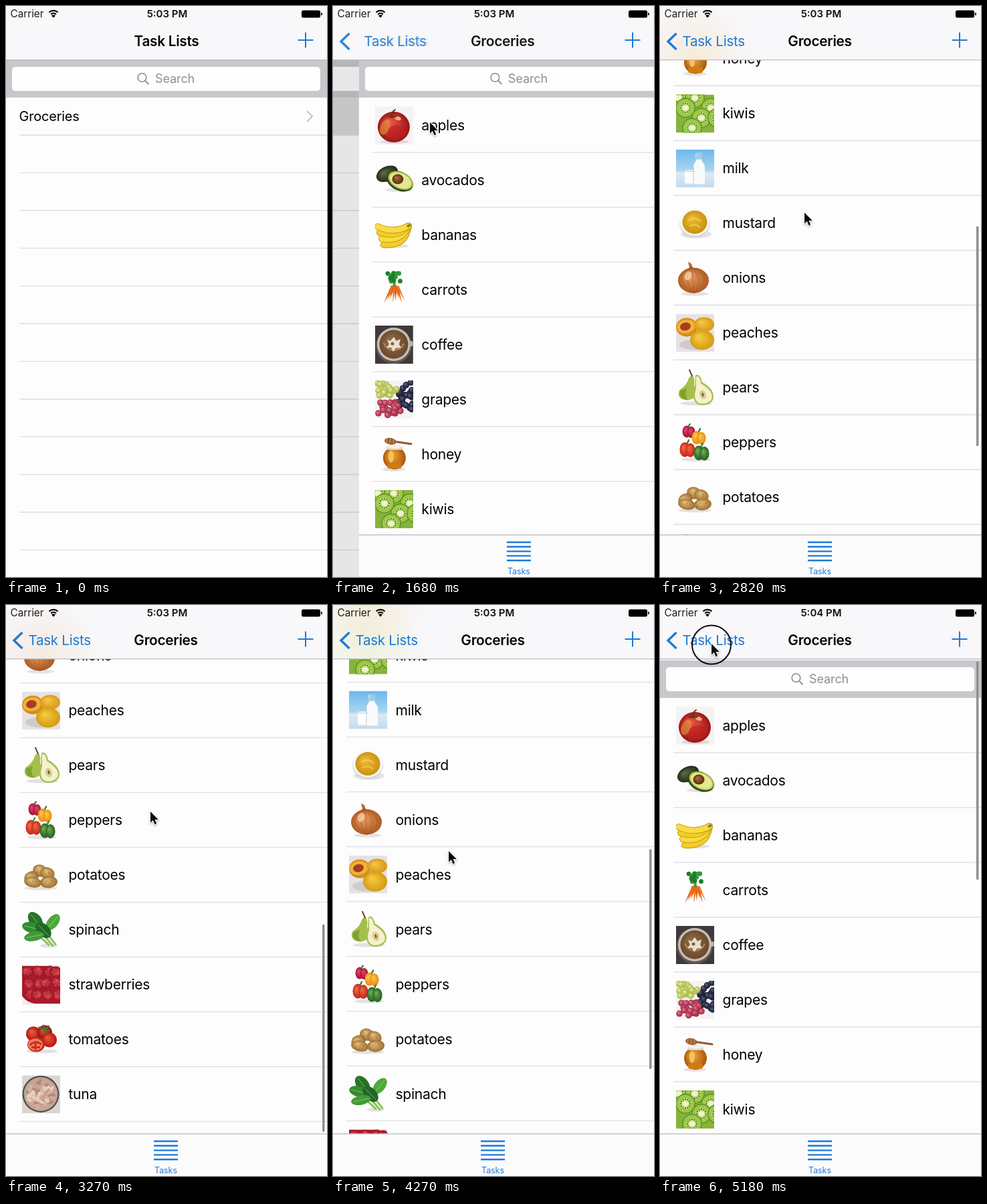
These frames come from a looping animation (480x854 px, 5.22 s). An HTML page with a canvas:

```html
<!DOCTYPE html>
<html lang="en">
<head>
<meta charset="utf-8">
<title>Task lists</title>
<style>
html, body { margin: 0; width: 100%; height: 100%; overflow: hidden; background: #fefdfe; }
canvas { display: block; width: 480px; height: 854px; }
</style>
</head>
<body>
<canvas id="stage" width="480" height="854"></canvas>
<script>
const g = document.getElementById('stage').getContext('2d');
const W = 480, H = 854, LOOP = 5220;
const NAV = 81, TAB = 791, HEAD = 56, ROW = 82, MAX = 904;
const BLUE = '#1c7bd6', PAPER = '#fefdfe', LINE = '#e1e1e6';

const clamp = v => Math.min(1, Math.max(0, v));
const span = (t, a, b) => clamp((t - a) / (b - a));
const smooth = u => u * u * (3 - 2 * u);
const mix = (a, b, u) => a + (b - a) * u;

// Drawing helpers
function rect(color, x, y, w, h, r = 0) {
  g.fillStyle = color;
  g.beginPath();
  g.roundRect(x, y, w, h, r);
  g.fill();
}

function text(str, x, y, size, color, { weight = 400, align = 'left', track = 0 } = {}) {
  g.font = `${weight} ${size}px Inter, "Liberation Sans", sans-serif`;
  g.letterSpacing = track + 'px';
  g.textAlign = align;
  g.fillStyle = color;
  g.fillText(str, x, y);
}

function stroke(color, width, d, cap = 'butt') {
  g.strokeStyle = color;
  g.lineWidth = width;
  g.lineCap = cap;
  g.stroke(new Path2D(d));
}

function area(color, d) {
  g.fillStyle = color;
  g.fill(new Path2D(d));
}

function dot(color, x, y, rx, ry = rx, rot = 0) {
  g.fillStyle = color;
  g.beginPath();
  g.ellipse(x, y, rx, ry, rot, 0, 7);
  g.fill();
}

function ball(light, dark, x, y, rx, ry = rx, rot = 0) {
  g.save();
  g.translate(x, y);
  g.rotate(rot);
  g.scale(rx, ry);
  const fill = g.createRadialGradient(-0.3, -0.35, 0.05, 0, 0, 1);
  fill.addColorStop(0, light);
  fill.addColorStop(1, dark);
  dot(fill, 0, 0, 1);
  g.restore();
}

function random(seed) {
  return () => (seed = (seed * 16807) % 2147483647) / 2147483647;
}

function scatter(seed, n, paint) {
  const rnd = random(seed);
  for (let i = 0; i < n; i++) paint(rnd(), rnd(), rnd());
}

const shade = (x, y, rx, ry = 3) => dot('rgba(90,80,80,.16)', x, y, rx, ry);

// Thumbnails, each in a 57 px square
const pics = {
  apples() {
    rect('#f4f2f2', 0, 0, 57, 57);
    shade(29, 53, 21);
    ball('#ee5a48', '#9c1416', 28, 31, 24, 23);
    dot('rgba(226,160,60,.55)', 15, 31, 7, 12, 0.4);
    dot('rgba(190,30,30,.6)', 33, 38, 14, 10);
    dot('rgba(250,210,180,.75)', 34, 18, 5, 3, 0.3);
    dot('#8b3316', 25, 15, 8, 2.5);
    stroke('#5a3519', 2, 'M25 16Q24 9 30 5', 'round');
  },
  avocados() {
    shade(36, 43, 20);
    ball('#5d6a45', '#202b19', 18, 19, 17, 11, -0.45);
    dot('#33451d', 37, 30, 21, 14, 0.45);
    dot('#a9c246', 38, 29, 19.5, 12.5, 0.45);
    dot('#e6e792', 38, 29, 17, 10.5, 0.45);
    ball('#a8703c', '#58300f', 34, 27, 8.5, 7.5);
  },
  bananas() {
    shade(28, 45, 22);
    for (let i = 0; i < 4; i++) {
      const d = `M50 15Q${46 - i * 6} ${45 - i * 6} ${13 - i * 3} ${43 - i * 9}`;
      stroke('#c99a12', 10, d, 'round');
      stroke(i % 2 ? '#f8dc42' : '#f3cd29', 8, d, 'round');
    }
    stroke('#8a8223', 4, 'M48 16L53 13');
  },
  carrots() {
    for (let i = 0; i < 8; i++) {
      const x = 13 + i * 4.5, y = 45 - (i % 3) * 3;
      area(i % 2 ? '#f07a24' : '#df5f16', `M${24 + i} 22L${29 + i} 23L${x} ${y + 3}Z`);
    }
    stroke('#4f9a32', 4, 'M29 24L28 12');
    scatter(31, 16, (a, b, c) => dot(c > 0.5 ? '#2f9c35' : '#1f7d2c', 19 + a * 19, 3 + b * 14, 3.4));
  },
  coffee() {
    rect('#40383b', 0, 0, 57, 57);
    dot('#5f5650', 28, 30, 27);
    rect('#b7b0a9', 47, 23, 10, 8, 3);
    dot('#c4beb6', 28, 28, 25);
    ball('#8f6a45', '#6b4a2d', 28, 28, 21.5);
    stroke('#b08d65', 2, 'M13 26A16 16 0 0 0 43 27');
    area('#e9dfcf', 'M18 21L23 23L28 17L32 23L38 20L36 28L39 33L31 34L27 39L24 33L17 33L21 28Z');
    dot('#80603f', 26, 27, 2.5);
  },
  grapes() {
    rect('#f5f2f4', 0, 0, 57, 57);
    const bunch = (seed, x, y, w, h, light, dark) =>
      scatter(seed, 24, (a, b) => ball(light, dark, x + a * w, y + b * h, 4.8));
    bunch(11, 36, 3, 20, 40, '#596080', '#15172a');
    bunch(23, 4, 4, 28, 20, '#eef0a2', '#a6b544');
    bunch(37, 5, 30, 34, 22, '#e2788f', '#a02342');
  },
  honey() {
    shade(28, 51, 17);
    ball('#f3ad3d', '#a95708', 29, 34, 17, 17);
    rect('#d07a12', 18, 41, 22, 9, 4);
    dot('#f5c25c', 24, 32, 4, 9);
    rect('#dcd6ce', 17, 16, 24, 6, 3);
    dot('#f4f0ea', 29, 17, 11, 3);
    stroke('#8d5a30', 3, 'M26 9L54 13', 'round');
    dot('#9a6334', 23, 9, 9, 5, 0.15);
    stroke('#d9a060', 1, 'M18 5L17 12M23 5L22 13M28 6L27 13');
  },
  kiwis() {
    rect('#86b43a', 0, 0, 57, 57);
    for (let i = 0; i < 7; i++) {
      const x = 4 + (i * 24) % 62, y = 5 + Math.floor(i / 2) * 15;
      dot('#628f22', x, y, 15);
      dot('#99c848', x, y, 13.5);
      dot('#b5d96a', x, y, 9);
      for (let k = 0; k < 12; k++) dot('#35471a', x + 7 * Math.cos(k * 0.524), y + 7 * Math.sin(k * 0.524), 0.9);
      dot('#eff3cf', x, y, 4.8, 4);
    }
  },
  milk() {
    const sky = g.createLinearGradient(0, 0, 0, 57);
    sky.addColorStop(0, '#6db7ea');
    sky.addColorStop(0.55, '#a9d5f1');
    sky.addColorStop(0.62, '#dce9f2');
    sky.addColorStop(1, '#c3dbec');
    rect(sky, 0, 0, 57, 57);
    area('#f8fafb', 'M29 6H39L38 16L43 24V52H26V24L30 16Z');
    rect('#9fcbe8', 30, 5, 9, 10);
    rect('#fdfdfd', 13, 31, 15, 20, 2);
    stroke('#b4cbd9', 1, 'M13 33H28M26 25V52');
  },
  mustard() {
    shade(30, 45, 23, 6);
    dot('#d8d6d8', 28, 29, 23, 21);
    dot('#f7f6f6', 28, 27, 22.5, 20);
    ball('#eebc31', '#cb9213', 28, 27, 18.5, 17.5);
    stroke('#f3cf62', 1.5, 'M18 25Q28 17 37 26M20 33Q29 28 36 35');
  },
  onions() {
    shade(28, 52, 20);
    area('#b96a31', 'M18 4L23 7L25 13Q39 17 36 26H9Q12 16 20 13Z');
    ball('#e9a064', '#ad5a23', 26, 32, 23, 19);
    for (let i = 0; i < 5; i++) stroke('rgba(140,66,22,.4)', 1, `M23 12Q${-8 + i * 17} 30 27 51`);
    dot('rgba(255,225,190,.6)', 18, 25, 5, 7, 0.4);
  },
  peaches() {
    rect('#e6e2e3', 0, 0, 57, 57);
    shade(30, 46, 25, 8);
    ball('#f2bd38', '#cf8714', 16, 20, 16, 14);
    dot('#f0b238', 15, 19, 14, 10, -0.2);
    dot('#a63c22', 14, 19, 8, 6, -0.2);
    ball('#f5c843', '#d9981b', 42, 16, 15, 11);
    ball('#f7cd3f', '#d59a15', 39, 39, 18, 15);
  },
  pears() {
    shade(30, 52, 24);
    area('#a5c04a', 'M23 10Q29 12 27 24Q33 46 17 47Q0 46 5 32Q17 24 19 14Z');
    area('#7fa22f', 'M6 33Q3 45 18 47Q12 40 16 29Z');
    stroke('#594223', 2, 'M24 11L20 2', 'round');
    area('#a8bf55', 'M29 10Q36 6 39 20Q60 32 55 47Q47 58 32 53Q22 46 28 29Z');
    area('#f4f1cd', 'M30 12Q35 9 37 22Q57 34 53 46Q45 55 33 51Q25 44 30 30Z');
    dot('#d9cd91', 40, 39, 5, 7, -0.3);
    dot('#7b5a2a', 40, 39, 1.5, 3, -0.3);
  },
  peppers() {
    const pepper = (light, dark, x, y, r) => {
      ball(light, dark, x - r * 0.35, y, r * 0.7, r);
      ball(light, dark, x + r * 0.4, y + 1, r * 0.65, r * 0.95);
      stroke('#3f8a34', 2.5, `M${x} ${y - r + 1}L${x + 2} ${y - r - 3}`, 'round');
    };
    shade(30, 54, 22);
    pepper('#e2476a', '#a50f31', 19, 12, 9);
    pepper('#ffc94a', '#ea8a12', 34, 21, 10);
    pepper('#f26a43', '#c4261a', 17, 39, 11);
    pepper('#6fae50', '#235f22', 38, 44, 11);
  },
  potatoes() {
    shade(28, 48, 25);
    const spud = (x, y, rx, ry, rot) => ball('#e2bd80', '#a0702f', x, y, rx, ry, rot);
    spud(27, 22, 11, 9, 0.3);
    spud(14, 32, 11, 9, -0.4);
    spud(38, 26, 11, 9, 0.4);
    spud(16, 39, 13, 8, 0.2);
    spud(40, 39, 13, 9, -0.1);
    scatter(7, 12, (a, b) => dot('rgba(110,72,28,.5)', 8 + a * 40, 22 + b * 22, 1));
  },
  spinach() {
    shade(40, 52, 13);
    stroke('#8cc25a', 3, 'M27 30L46 52M31 26L50 50M24 36L40 51', 'round');
    const leaf = (color, x, y, rx, ry, rot) => {
      dot(color, x, y, rx, ry, rot);
      const dx = Math.cos(rot) * rx * 0.8, dy = Math.sin(rot) * rx * 0.8;
      stroke('rgba(170,215,130,.7)', 1, `M${x - dx} ${y - dy}L${x + dx} ${y + dy}`);
    };
    leaf('#267428', 20, 14, 14, 9, 0.9);
    leaf('#4da83b', 46, 17, 14, 8, -0.9);
    leaf('#338c30', 14, 25, 14, 8, 0.25);
    leaf('#1f6826', 32, 29, 14, 9, 0.8);
    leaf('#429a37', 18, 38, 15, 7, -0.2);
  },
  strawberries() {
    rect('#a91a2a', 0, 0, 57, 57);
    area('#f6eeee', 'M0 45Q8 57 25 57H0ZM44 0H57V9Z');
    for (let i = 0; i < 12; i++) {
      const x = 8 + (i % 4) * 14 + (i % 3) * 2, y = 9 + Math.floor(i / 4) * 17;
      ball('#db4650', '#9c1425', x, y, 9.5, 8, i);
      for (let k = 0; k < 5; k++) dot('#e78a7c', x + 5 * Math.cos(k * 1.3 + i), y + 4 * Math.sin(k * 1.3 + i), 0.7);
    }
  },
  tomatoes() {
    shade(30, 46, 23);
    ball('#ef5944', '#a8170f', 17, 20, 11);
    ball('#e44b37', '#8f120c', 34, 18, 11);
    ball('#f0553d', '#b11a11', 41, 29, 11);
    stroke('#46752c', 2, 'M25 10L40 15M32 7L36 19M40 8L32 17', 'round');
    dot('#c8261a', 21, 36, 13, 11);
    dot('#ef8064', 20, 36, 11, 9);
    stroke('#cb2f20', 3, 'M12 37Q20 28 29 36M20 31V44M14 40H27');
  },
  tuna() {
    rect('#d9d6d2', 0, 0, 57, 57);
    dot('#4d4844', 28, 28, 27.5);
    dot('#a9a29a', 28, 28, 25.5);
    dot('#c9a595', 28, 28, 24);
    scatter(53, 46, (a, b, c) => {
      const r = 20 * Math.sqrt(a), q = b * 6.283;
      dot(c > 0.6 ? '#e6cfc0' : c > 0.3 ? '#b78877' : '#d5b4a2', 28 + r * Math.cos(q), 28 + r * Math.sin(q), 4, 2.2, c * 6);
    });
  }
};
const items = Object.keys(pics);

// Colours that shine through the navigation bar
const tints = { bananas: '250,225,60', kiwis: '190,215,80', onions: '225,165,100', honey: '235,170,60' };

function thumb(name, x, y) {
  g.save();
  g.translate(x, y);
  g.beginPath();
  g.rect(0, 0, 57, 57);
  g.clip();
  pics[name]();
  g.restore();
}

function searchBar(y) {
  rect('#c8c7cc', 0, y, W, HEAD);
  rect('#fefefe', 9, y + 10, 461, 36, 5);
  g.strokeStyle = '#8b8b90';
  g.lineWidth = 1.6;
  g.beginPath();
  g.arc(203.5, y + 26, 6.3, 0, 7);
  g.stroke();
  stroke('#8b8b90', 1.8, `M208 ${y + 30.6}L213.5 ${y + 36}`);
  text('Search', 223, y + 34, 18, '#8e8e93', { track: -0.1 });
}

function listScreen(pressed) {
  rect(PAPER, 0, 0, W, H);
  searchBar(NAV);
  if (pressed) rect('#d9d9d9', 0, 137, W, 56);
  for (let y = 193; y < H; y += 56.4) rect(LINE, 20, y - 0.7, W, 1.6);
  text('Groceries', 19.5, 172, 20, '#000', { track: -0.2 });
  stroke('#c3c3c8', 2, 'M450 157L458 165L450 173');
}

function scrollBar(pos, alpha) {
  const over = Math.max(0, -pos, pos - MAX);
  const top = 84 + Math.min(MAX, Math.max(0, pos)) * 0.4147 + (pos > MAX ? over : 0);
  g.globalAlpha = alpha;
  rect('#8f8f92', 473, top, 3.5, 329 - over, 1.7);
  g.globalAlpha = 1;
}

function taskScreen(pos, barAlpha) {
  rect(PAPER, 0, 0, W, H);
  if (pos < 0) rect('#f4f4f6', 0, NAV, W, -pos);
  searchBar(NAV - pos);
  items.forEach((name, i) => {
    const y = NAV + HEAD + i * ROW - pos;
    if (y > TAB || y + ROW < 0) return;
    thumb(name, 24, y + 13);
    text(name, 93.5, y + 49, 21, '#000', { track: -0.25 });
    rect(LINE, 20, y + ROW - 0.8, W, 1.6);
  });
  scrollBar(pos, barAlpha);
  rect('#fbfbfc', 0, TAB, W, H);
  rect('#c2c2c5', 0, TAB - 0.7, W, 1.4);
  for (let i = 0; i < 5; i++) rect(BLUE, 221, 800.8 + i * 6.8, 36, 2.4);
  text('Tasks', 239, 850, 12.4, BLUE, { align: 'center' });
}

function statusBar(time) {
  text('Carrier', 6.5, 17, 15.3, '#1d1d1f');
  text(time, 241, 17, 15, '#111', { weight: 600, align: 'center' });
  g.strokeStyle = '#000';
  g.lineWidth = 2.1;
  for (const r of [5.6, 9.6]) {
    g.beginPath();
    g.arc(71, 16.5, r, -2.32, -0.82);
    g.stroke();
  }
  area('#000', 'M71 17.8L68 14.3Q71 12 74 14.3Z');
  rect('#000', 442, 6.5, 28, 11, 2.5);
  rect('#000', 471, 10, 1.8, 4, 1);
}

function navBar(p, pos, time) {
  rect('#f8f7f9', 0, 0, W, NAV - 1);
  items.forEach((name, i) => {
    const y = NAV + HEAD + i * ROW + 41 - pos;
    if (p < 1 || !tints[name] || y < -40 || y > 110) return;
    const glow = g.createRadialGradient(52, y, 0, 52, y, 85);
    glow.addColorStop(0, `rgba(${tints[name]},.16)`);
    glow.addColorStop(1, `rgba(${tints[name]},0)`);
    rect(glow, 0, 0, W, NAV - 1);
  });
  rect('#bcbbbf', 0, NAV - 1, W, 1.2);
  statusBar(time);
  const title = { weight: 600, align: 'center', track: -0.3 };
  if (p < 1) {
    g.globalAlpha = 1 - p;
    text('Task Lists', mix(240, 82, p), 60, 20.8, '#050505', title);
  }
  if (p > 0) {
    g.globalAlpha = p;
    text('Groceries', mix(420, 239, p), 60, 20.8, '#050505', title);
    text('Task Lists', mix(190, 33.5, p), 60, 20.5, BLUE, { track: -0.25 });
    stroke(BLUE, 3.4, 'M24.5 41L12 53L24.5 65');
  }
  g.globalAlpha = 1;
  stroke(BLUE, 2, 'M436.5 51H459.5M448 39.5V62.5');
}

// Motion
const drag1 = { from: 2440, to: 2678, dist: 318, speed: 2200 };
const drag2 = { from: 4085, to: 4260, dist: 201, speed: 2350 };

// Finger drag, then friction, then an edge spring
function travel(t, { from, to, dist, speed }) {
  if (t < to) return dist * span(t, from, to) ** 2;
  const s = (t - to) / 1000, left = MAX - dist;
  const hit = -Math.log(1 - 2 * left / speed) / 2;
  if (s < hit) return dist + speed / 2 * (1 - Math.exp(-2 * s));
  const b = s - hit;
  return MAX + (speed - 2 * left) * b * Math.exp(-11.6 * b);
}

const scrollAt = t => t < drag2.from ? travel(t, drag1) : MAX - travel(t, drag2);

const easeOut = u => 1 - (1 - u) ** 3;
const square = u => u * u;
const path = [
  [50, 440, 742],
  [550, 145, 290, smooth],
  [950, 145, 174, easeOut],
  [1700, 145, 174],
  [2300, 216, 627, smooth],
  [drag1.from, 216, 627],
  [drag1.to, 216, 309, square],
  [3600, 216, 309],
  [4020, 185, 170, smooth],
  [drag2.from, 185, 170],
  [drag2.to, 173, 368, square],
  [4300, 173, 368],
  [4730, 92, 122, smooth],
  [5060, 77, 58, easeOut],
  [LOOP, 77, 58]
];

function pointerAt(t) {
  const i = Math.max(1, path.findIndex(k => k[0] >= t));
  const [t0, x0, y0] = path[i - 1], [t1, x1, y1, ease = smooth] = path[i];
  const u = ease(span(t, t0, t1));
  return [mix(x0, x1, u), mix(y0, y1, u)];
}

const presses = [[1300, 1440], [2380, 2690], [4050, 4260], [5120, LOOP]];

function pointer(t) {
  if (t < 50) return;
  const [x, y] = pointerAt(t);
  if (presses.some(([a, b]) => t >= a && t < b)) {
    g.strokeStyle = '#0b0b0b';
    g.lineWidth = 2;
    g.beginPath();
    g.arc(x, y + 1.5, 29, 0, 7);
    g.stroke();
  }
  g.save();
  g.translate(x, y);
  const d = 'M0 0V16.5L3.8 13L6.6 19.2L9.2 18L6.5 12H11.8Z';
  g.shadowColor = 'rgba(0,0,0,.3)';
  g.shadowBlur = 3;
  g.shadowOffsetY = 1.5;
  g.lineJoin = 'round';
  stroke('#fff', 2, d);
  g.shadowColor = 'transparent';
  area('#0a0a0a', d);
  g.lineJoin = 'miter';
  g.restore();
}

function draw(t) {
  const p = 1 - (1 - span(t, 1420, 1880)) ** 3;
  const pos = scrollAt(t);
  const bar = t < drag2.from ? span(t, 1850, 1950) * (1 - span(t, 3620, 3800)) : 1;
  g.clearRect(0, 0, W, H);
  if (p < 1) {
    g.save();
    g.translate(-144 * p, 0);
    listScreen(t >= 1320);
    g.restore();
    if (p > 0) rect(`rgba(0,0,0,${0.1 * p})`, 0, NAV, W, H);
  }
  if (p > 0) {
    g.save();
    g.translate(W * (1 - p), 0);
    taskScreen(pos, bar);
    g.restore();
  }
  navBar(p, pos, t < 4970 ? '5:03 PM' : '5:04 PM');
  pointer(t);
}

const start = performance.now();
function tick() {
  draw((performance.now() - start) % LOOP);
  requestAnimationFrame(tick);
}
tick();
</script>
</body>
</html>
```
